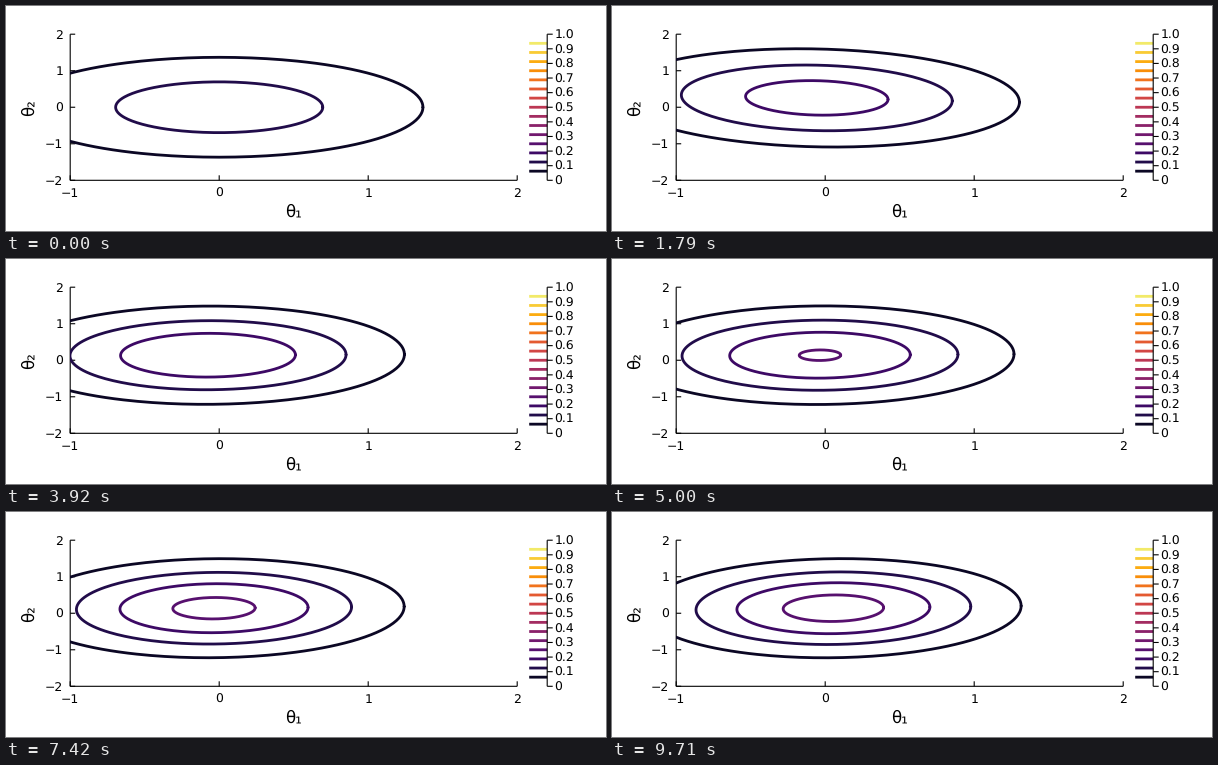
Write a matplotlib script that moves like this. It is 600 by 225 pixels and loops after 9750 ms.

```python
import numpy as np
import matplotlib.pyplot as plt
from matplotlib.animation import FuncAnimation
from matplotlib.patches import Rectangle

W, H, DPI = 600, 225, 100
FRAMES, INTERVAL = 250, 39
LAST = 242
PX = 72 / DPI

LEFT, RIGHT, TOP, BOTTOM = 64.2, 511.2, 28.2, 174.3
BAR_X = 541.2
LEVELS = np.arange(1, 16) / 16
CMAP = plt.get_cmap("inferno")

plt.rcParams["font.family"] = "DejaVu Sans"
plt.rcParams["text.hinting"] = "none"


def px(x):
    return LEFT + (x + 1) / 3 * (RIGHT - LEFT)


def py(y):
    return BOTTOM - (y + 2) / 4 * (BOTTOM - TOP)


def bar_y(v):
    return BOTTOM - v * (BOTTOM - TOP)


def ease(n, start, end):
    u = np.clip((n - start) / (end - start), 0, 1)
    return u * u * (3 - 2 * u)


def mean(n):
    """Centre of the posterior after n observations."""
    m1 = (0.045 * ease(n, 0, 18) - 0.165 * ease(n, 28, 54)
          + 0.085 * ease(n, 68, 124) + 0.09 * ease(n, 190, 222))
    m2 = 0.138 * ease(n, 0, 50) + 0.207 * np.exp(-((n - 38) / 5) ** 2 / 2)
    return m1, m2


def covariance(n):
    """The spread shrinks with n; the early tilt fades away."""
    v1 = 1 / (1 + 0.4 * np.log(1 + n / 30))
    v2 = 0.68 - 0.00026 * n + 0.32 * np.exp(-n / 24)
    u = n / 25
    cov = 0.00011 * n - 0.14 * (u * np.exp(1 - u)) ** 4
    return np.array([[v1, cov], [cov, v2]])


ANGLE = np.linspace(0, 2 * np.pi, 241)
CIRCLE = np.array([np.cos(ANGLE), np.sin(ANGLE)])

fig = plt.figure(figsize=(W / DPI, H / DPI), dpi=DPI, facecolor="white")
ax = fig.add_axes([0, 0, 1, 1])
ax.set_xlim(0, W)
ax.set_ylim(H, 0)
ax.axis("off")


def line(xs, ys, color="black", width=1.1):
    ax.plot(xs, ys, color=color, lw=width * PX, solid_capstyle="butt",
            snap=False)


def label(x, y, text, size=12.4, ha="center", rotation=0):
    ax.text(x, y, text, fontsize=size * PX, ha=ha, va="baseline",
            rotation=rotation, rotation_mode="anchor")


def name(v):
    return str(v).replace("-", "\u2212")


def draw_axes():
    line([LEFT, RIGHT], [BOTTOM, BOTTOM])
    line([LEFT, LEFT], [TOP, BOTTOM])
    for v in range(-1, 3):
        line([px(v)] * 2, [BOTTOM, BOTTOM - 5])
        label(px(v), 190.7, name(v))
    for v in range(-2, 3):
        line([LEFT, LEFT + 5], [py(v)] * 2)
        label(57.4, py(v) + 4.6, name(v), ha="right")
    label((LEFT + RIGHT) / 2, 210.5, "θ₁", 16.6)
    label(27.5, (TOP + BOTTOM) / 2, "θ₂", 16.6, rotation=90)


def draw_colorbar():
    for v in LEVELS:
        line([523.2, BAR_X], [bar_y(v)] * 2, CMAP(v), 2.8)
    line([BAR_X, BAR_X], [TOP, BOTTOM])
    for k in range(11):
        y = bar_y(k / 10)
        line([BAR_X, BAR_X + 5.5], [y, y])
        label(548.6, y + 4.6, f"{k / 10:.1f}" if k else "0", ha="left")


draw_axes()
draw_colorbar()

window = Rectangle((LEFT, TOP), RIGHT - LEFT, BOTTOM - TOP,
                   transform=ax.transData)
contours = []
for v in LEVELS:
    ring, = ax.plot([], [], color=CMAP(v), lw=2.8 * PX, zorder=3,
                    solid_capstyle="round", solid_joinstyle="round")
    ring.set_clip_path(window)
    contours.append(ring)


def update(i):
    t = i * INTERVAL + INTERVAL / 2
    n = np.clip((t - 30) // 40, 0, LAST)
    m1, m2 = mean(n)
    sigma = covariance(n)
    peak = 1 / (2 * np.pi * np.sqrt(np.linalg.det(sigma)))
    unit = np.linalg.cholesky(sigma) @ CIRCLE
    for v, ring in zip(LEVELS, contours):
        if v < peak:
            x, y = unit * np.sqrt(2 * np.log(peak / v))
            ring.set_data(px(m1 + x), py(m2 + y))
        else:
            ring.set_data([], [])
    return contours


anim = FuncAnimation(fig, update, frames=FRAMES, interval=INTERVAL,
                     repeat=True, repeat_delay=0, blit=False)
plt.show()
```
